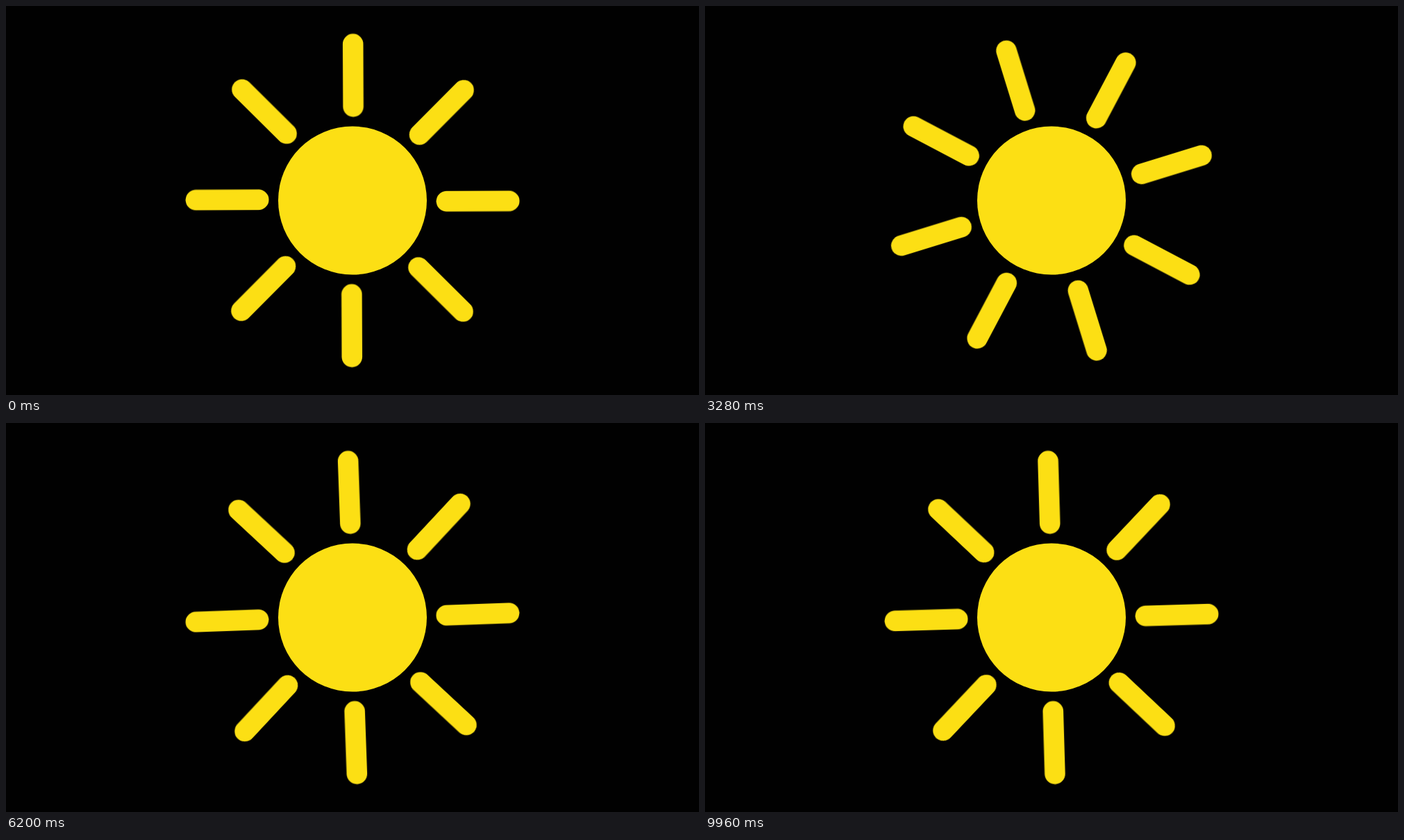
Write an HTML page that moves like this. It is 998 px wide and 561 px high and loops after 10 s.

```html
<!DOCTYPE html>
<html lang="en">
<head>
<meta charset="utf-8">
<title>Sun</title>
<style>
  html, body {
    margin: 0;
    width: 100%;
    height: 100%;
    overflow: hidden;
    background: #010101;
  }
  svg {
    display: block;
    width: 100%;
    height: 100%;
  }
  .disc { fill: #fcdf14; }
  .rays {
    stroke: #fcdf14;
    stroke-width: 29.6;
    stroke-linecap: round;
    transform-origin: 0 0;
    /* 25 poses per second; the small lead keeps samples off the step edges */
    animation: spin 10s steps(250) -2ms infinite;
  }
  @keyframes spin {
    from { transform: rotate(-0.25deg); }
    to { transform: rotate(359.75deg); }
  }
</style>
</head>
<body>
<svg viewBox="0 0 998 561">
  <defs>
    <line id="ray" x1="1.7" y1="-225.6" x2="1.7" y2="-135.4"/>
    <g id="pair">
      <use href="#ray"/>
      <use href="#ray" transform="rotate(180)"/>
    </g>
  </defs>
  <g transform="translate(499 280.5)">
    <circle class="disc" r="107"/>
    <g class="rays">
      <use href="#pair"/>
      <use href="#pair" transform="rotate(45)"/>
      <use href="#pair" transform="rotate(90)"/>
      <use href="#pair" transform="rotate(135)"/>
    </g>
  </g>
</svg>
</body>
</html>
```
